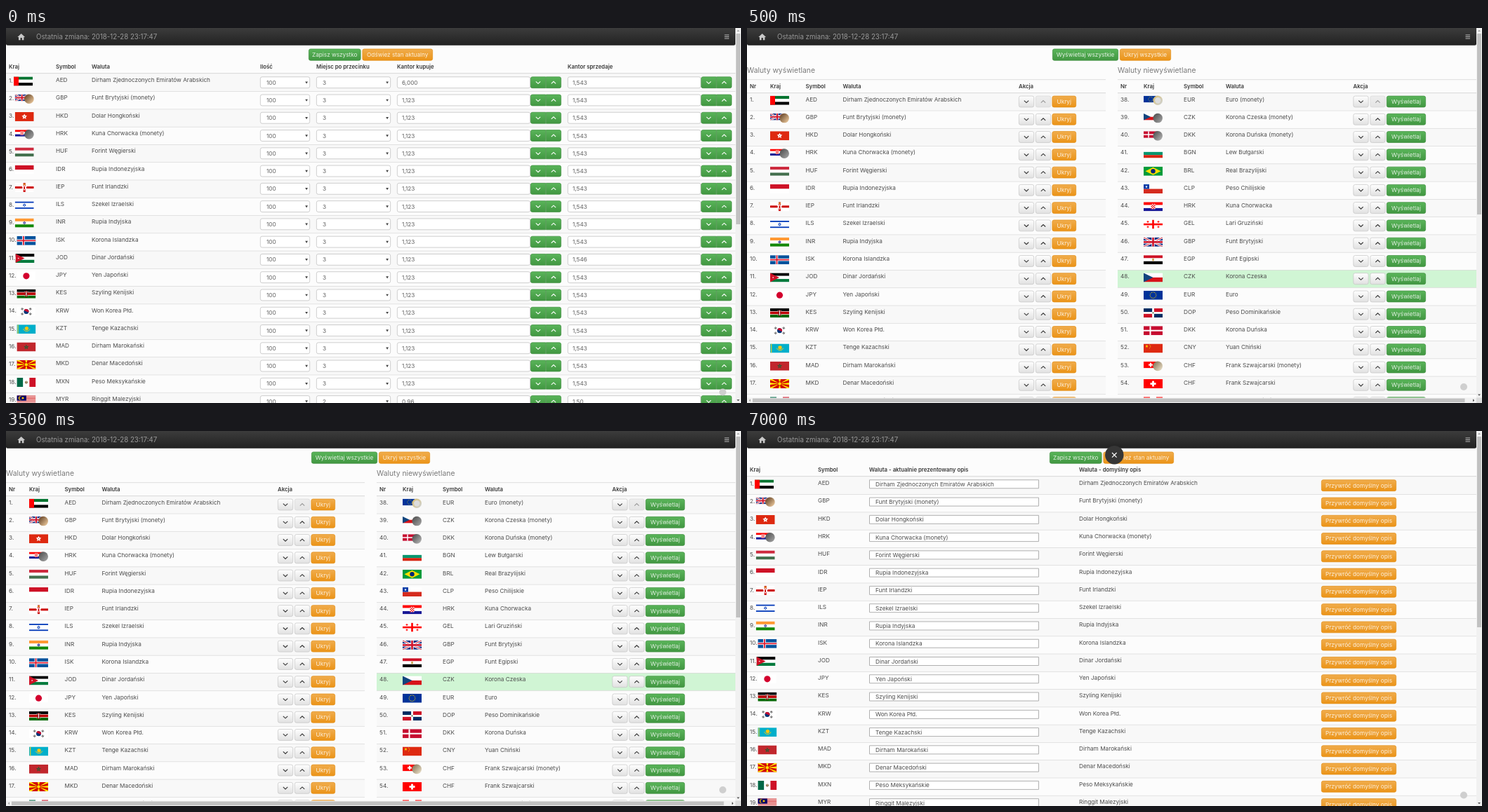
Recreate the animation shown at these times as an HTML page with a canvas. Size 1047x535 px, loop 8 s.

```html
<!DOCTYPE html>
<html lang="pl">
<head>
<meta charset="utf-8">
<title>Waluty</title>
<style>
html, body { margin: 0; width: 100%; height: 100%; overflow: hidden; background: #fcfcfc; }
canvas { display: block; }
</style>
</head>
<body>
<canvas id="stage" width="1047" height="535"></canvas>
<script>
const g = document.getElementById('stage').getContext('2d');
const STEP = 25.27, SIZE = 8.22;
const INK = '#4c4c4c', GREEN = ['#5ab55a', '#419641', '#3e8f3e'], ORANGE = ['#f0ad4e', '#eb9316', '#e38d13'],
  GREY = ['#ffffff', '#e0e0e0', '#c4c4c4'], OFF = ['#eeeeee', '#e4e4e4', '#d8d8d8'];

const parse = s => s.split('|').map(r => [r.slice(0, 3), r[3] === '*', r.slice(4).trim()]);
const shown = parse('AED Dirham Zjednoczonych Emiratów Arabskich|GBP*Funt Brytyjski (monety)|HKD Dolar Hongkoński|' +
  'HRK*Kuna Chorwacka (monety)|HUF Forint Węgierski|IDR Rupia Indonezyjska|IEP Funt Irlandzki|ILS Szekel Izraelski|' +
  'INR Rupia Indyjska|ISK Korona Islandzka|JOD Dinar Jordański|JPY Yen Japoński|KES Szyling Kenijski|KRW Won Korea Płd.|' +
  'KZT Tenge Kazachski|MAD Dirham Marokański|MKD Denar Macedoński|MXN Peso Meksykańskie|MYR Ringgit Malezyjski');
const hidden = parse('EUR*Euro (monety)|CZK*Korona Czeska (monety)|DKK*Korona Duńska (monety)|BGN Lew Bułgarski|' +
  'BRL Real Brazylijski|CLP Peso Chilijskie|HRK Kuna Chorwacka|GEL Lari Gruziński|GBP Funt Brytyjski|EGP Funt Egipski|' +
  'CZK Korona Czeska|EUR Euro|DOP Peso Dominikańskie|DKK Korona Duńska|CNY Yuan Chiński|CHF*Frank Szwajcarski (monety)|' +
  'CHF Frank Szwajcarski|CAD Dolar Kanadyjski');
// upper left and lower right shade of each coin
const coins = { GBP: ['#6b4a2c', '#e0bd92'], HRK: ['#555', '#999'], EUR: ['#d8c07a', '#d0d0c8'],
  CZK: ['#555', '#999'], DKK: ['#555', '#aaa'], CHF: ['#8a7a5c', '#e0d4bc'] };

function rect(x, y, w, h, c) { g.fillStyle = c; g.fillRect(x, y, w, h); }
function disc(x, y, r, c) { g.fillStyle = c; g.beginPath(); g.arc(x, y, r, 0, 7); g.fill(); }
function path(...p) {
  g.beginPath();
  for (let i = 0; i < p.length; i += 2) g.lineTo(p[i], p[i + 1]);
}
function poly(c, ...p) { path(...p); g.fillStyle = c; g.fill(); }
function line(c, w, ...p) { path(...p); g.strokeStyle = c; g.lineWidth = w; g.stroke(); }
function star(x, y, r, c, n = 5, inner = .4) {
  const p = [];
  for (let i = 0; i < 2 * n; i++) {
    const a = i * Math.PI / n, d = i % 2 ? r * inner : r;
    p.push(x + d * Math.sin(a), y - d * Math.cos(a));
  }
  poly(c, ...p);
}
function fade(x0, y0, x1, y1, from, to) {
  const f = g.createLinearGradient(x0, y0, x1, y1);
  f.addColorStop(0, from);
  f.addColorStop(1, to);
  return f;
}
// y is the middle of the capital letters
function text(s, x, y, c = INK, size = SIZE, weight = 400, align = 'left') {
  g.font = `${weight} ${size}px Inter, "Open Sans", sans-serif`;
  g.textAlign = align;
  g.fillStyle = c;
  g.fillText(s, x, y + size * .36);
}
const head = (s, x, y) => text(s, x, y, '#3a3a3a', 7.8, 600);

function box(x, y, w, h, fill, edge, r = 2.5, lw = .7) {
  g.beginPath();
  g.roundRect(x + lw / 2, y + lw / 2, w - lw, h - lw, r);
  g.fillStyle = fill; g.fill();
  g.strokeStyle = edge; g.lineWidth = lw; g.stroke();
}
function button(x, y, w, tone, label, h = 16.6, r = 2.5) {
  box(x, y, w, h, fade(0, y, 0, y + h, tone[0], tone[1]), tone[2], r);
  if (label) text(label, x + w / 2, y + h / 2, 'rgba(255,255,255,.85)', SIZE, 400, 'center');
}
function arrowButton(x, y, w, tone, dir, c, r) {
  button(x, y, w, tone, '', 16.6, r);
  const m = x + w / 2, v = y + 8.4;
  line(c, 1.1, m - 3.2, v - 1.5 * dir, m, v + 1.5 * dir, m + 3.2, v - 1.5 * dir);
}
function select(x, y, w, label) {
  box(x, y, w, 16.6, '#fff', '#bbb');
  text(label, x + 9, y + 8.4, '#5f5f5f');
  poly('#444', x + w - 6.8, y + 7, x + w - 3, y + 7, x + w - 4.9, y + 10.2);
}
function field(x, y, value) {
  box(x, y, 190, 16.6, '#fff', '#bbb');
  text(value, x + 7, y + 8.4, '#5f5f5f');
  arrowButton(x + 190, y, 22, GREEN, 1, '#fff', [2.5, 0, 0, 2.5]);
  arrowButton(x + 212, y, 22, GREEN, -1, '#fff', [0, 2.5, 2.5, 0]);
}

// Flags are drawn in a 27 by 13 box
const rows = (...c) => c.forEach((k, i) => rect(0, i * 13 / c.length, 27, 13 / c.length, k));
const cols = (...c) => c.forEach((k, i) => rect(i * 27 / c.length, 0, 27 / c.length, 13, k));
function cross(bg, c, x, w) {
  if (bg) rows(bg);
  rect(x - w / 2, 0, w, 13, c);
  rect(0, 6.5 - w / 2, 27, w, c);
}
const flags = {
  AED() { rows('#00732f', '#fff', '#000'); rect(0, 0, 7, 13, '#f00'); },
  GBP() {
    rows('#00247d');
    for (const [c, w] of [['#fff', 3], ['#cf142b', 1]]) {
      line(c, w, 0, 0, 27, 13);
      line(c, w, 0, 13, 27, 0);
    }
    cross(0, '#fff', 13.5, 4.4);
    cross(0, '#cf142b', 13.5, 2.6);
  },
  HKD() { rows('#de2910'); star(13.5, 6.5, 4, '#fff', 5, .5); disc(13.5, 6.5, .7, '#de2910'); },
  HRK() {
    rows('#f00', '#fff', '#171796');
    rect(10.5, 2.5, 6, 7.5, '#fff');
    for (let i = 0; i < 20; i++) if ((i + (i >> 2)) % 2 === 0)
      rect(10.5 + i % 4 * 1.5, 2.5 + (i >> 2) * 1.5, 1.5, 1.5, '#e00');
  },
  HUF() { rows('#cd2a3e', '#fff', '#436f4d'); },
  IDR() { rows('#ce1126', '#fff'); },
  IEP() {
    cross('#fff', '#cc0000', 13.5, 3);
    star(13.5, 6.8, 4.2, '#fff', 6, .6);
    rect(12.6, 5, 1.8, 4, '#cc0000');
    rect(12, 1, 3, 1.6, '#d8a62a');
  },
  ILS() {
    rows('#fff');
    rect(0, 1.4, 27, 1.8, '#0038b8');
    rect(0, 9.8, 27, 1.8, '#0038b8');
    star(13.5, 6.5, 2.6, '#0038b8', 6, .58);
    disc(13.5, 6.5, .9, '#fff');
  },
  INR() { rows('#ff9933', '#fff', '#138808'); disc(13.5, 6.5, 1.8, '#000088'); disc(13.5, 6.5, 1.1, '#aac'); },
  ISK() { cross('#02529c', '#fff', 9.5, 3.6); cross(0, '#dc1e35', 9.5, 1.8); },
  JOD() { rows('#000', '#fff', '#007a3d'); poly('#ce1126', 0, 0, 13, 6.5, 0, 13); star(4.2, 6.5, 1.3, '#fff', 7); },
  JPY() { rows('#fff'); disc(13.5, 6.5, 4.6, '#d3002d'); },
  KES() {
    rows('#000', '#fff', '#006600');
    rect(0, 4, 27, 5, '#fff');
    rect(0, 4.7, 27, 3.6, '#b00');
    g.beginPath(); g.ellipse(13.5, 6.5, 2, 4.6, 0, 0, 7); g.fillStyle = '#800'; g.fill();
    rect(13, 3, 1, 7, '#fff');
    line('#ddd', .4, 10.5, 2, 16.5, 11);
    line('#ddd', .4, 16.5, 2, 10.5, 11);
  },
  KRW() {
    rows('#fff');
    disc(13.5, 6.5, 3.5, '#003478');
    g.beginPath(); g.arc(13.5, 6.5, 3.5, Math.PI + .4, 2 * Math.PI + .4); g.fillStyle = '#c60c30'; g.fill();
    for (const sx of [-1, 1]) for (const sy of [-1, 1]) for (let k = 0; k < 3; k++) {
      const x = 13.5 + sx * (5 + k * .8), y = 6.5 + sy * (3 + k * .6);
      line('#111', .65, x - sx * .8, y + sy * 1.2, x + sx * .8, y - sy * 1.2);
    }
  },
  KZT() {
    rows('#00afca');
    rect(1, 0, 1.3, 13, '#d8cc38');
    star(14, 5.4, 3.2, '#fec50c', 12, .7);
    g.beginPath(); g.arc(14, 4.4, 5, .35, Math.PI - .35);
    g.strokeStyle = '#e8c820'; g.lineWidth = 1; g.stroke();
  },
  MAD() { rows('#c1272d'); star(13.5, 6.7, 3.9, '#176233'); star(13.5, 6.7, 1.7, '#a02a2d'); },
  MKD() {
    rows('#d20000');
    for (const [x, y, dx, dy] of [[0, 0, 3, 0], [27, 0, 3, 0], [13.5, 0, 1.6, 0], [0, 6.5, 0, 1.6]])
      poly('#ffe600', x - dx, y - dy, x + dx, y + dy, 27 - x - dx, 13 - y - dy, 27 - x + dx, 13 - y + dy);
    disc(13.5, 6.5, 2.9, '#d20000');
    disc(13.5, 6.5, 2.2, '#ffe600');
  },
  MXN() { cols('#006847', '#fff', '#ce1126'); disc(13.5, 6.5, 2, '#8a7050'); disc(13.5, 6, .9, '#c8b890'); },
  MYR() {
    for (let i = 0; i < 14; i++) rect(0, i * 13 / 14, 27, 1, i % 2 ? '#fff' : '#cc0001');
    rect(0, 0, 13.5, 7.4, '#010066');
    disc(5, 3.7, 2.6, '#fc0'); disc(5.9, 3.7, 2.2, '#010066'); star(8.6, 3.7, 2.1, '#fc0', 11, .5);
  },
  EUR() {
    rows('#003399');
    for (let i = 0; i < 12; i++) disc(13.5 + 4.3 * Math.cos(i * Math.PI / 6), 6.5 + 4.3 * Math.sin(i * Math.PI / 6), .6, '#fc0');
  },
  CZK() { rows('#fff', '#d7141a'); poly('#11457e', 0, 0, 13.5, 6.5, 0, 13); },
  DKK() { cross('#c60c30', '#fff', 9.5, 2); },
  BGN() { rows('#fff', '#00966e', '#d62612'); },
  BRL() { rows('#009b3a'); poly('#fedf00', 2.5, 6.5, 13.5, 1, 24.5, 6.5, 13.5, 12); disc(13.5, 6.5, 3.2, '#002776'); },
  CLP() { rows('#fff', '#d52b1e'); rect(0, 0, 8, 6.5, '#0039a6'); star(4, 3.3, 2, '#fff'); },
  GEL() {
    cross('#fff', '#f00', 13.5, 2.6);
    for (const x of [6, 21]) for (const y of [2.8, 10.2]) {
      rect(x - 1.5, y - .5, 3, 1, '#f00');
      rect(x - .5, y - 1.5, 1, 3, '#f00');
    }
  },
  EGP() { rows('#ce1126', '#fff', '#000'); rect(12.3, 4.8, 2.4, 3.4, '#c8a048'); },
  DOP() {
    cols('#002d62', '#ce1126');
    rect(0, 6.5, 13.5, 6.5, '#ce1126');
    rect(13.5, 6.5, 13.5, 6.5, '#002d62');
    cross(0, '#fff', 13.5, 2.8);
    disc(13.5, 6.5, 1.1, '#5a7a50');
  },
  CNY() {
    rows('#de2910');
    star(4.5, 3.6, 2.3, '#ffde00');
    for (let i = 0; i < 4; i++) disc(8.5 + (i % 3 ? 1.2 : 0), 1.4 + i * 1.6, .5, '#ffde00');
  },
  CHF() { rows('#f00'); rect(12.1, 2.5, 2.8, 8, '#fff'); rect(9.5, 5.1, 8, 2.8, '#fff'); },
  CAD() { cols('#f00', '#fff', '#f00'); star(13.5, 6.5, 4, '#f00'); }
};
function flag([code, coin], x, y) {
  g.save();
  g.translate(x, y);
  g.save();
  if (coin) g.scale(.74, .74);
  g.beginPath(); g.rect(0, 0, 27, 13); g.clip();
  flags[code]();
  g.restore();
  if (coin) {
    disc(20.2, 6.6, 6.8, fade(15, 2, 25, 11, ...coins[code]));
    if (code === 'EUR') disc(20.2, 6.6, 4.2, '#ddd');
  }
  g.restore();
}

function stripe(x, y, w, i, tint) {
  if (tint || i % 2 === 0) rect(x, y, w, STEP, tint || '#f8f8f8');
  if (i) rect(x, y, w, .7, '#d8d8d8');
}
function frame() {
  rect(0, 0, 1047, 535, '#fcfcfc');
  g.beginPath(); g.roundRect(0, -4, 1039, 28.8, 2.5);
  g.fillStyle = fade(0, 0, 0, 25, '#3c3c3c', '#212121'); g.fill();
  poly('#c8c8c8', 16.3, 13, 21.7, 8, 27.1, 13, 25.4, 13, 25.4, 17.2, 22.8, 17.2, 22.8, 14, 20.6, 14, 20.6, 17.2, 18, 17.2, 18, 13);
  text('Ostatnia zmiana: 2018-12-28 23:17:47', 43, 12.6, '#999', 9.7);
  for (let i = 0; i < 3; i++) rect(1023.5, 9.5 + i * 2.5, 6.5, 1, '#bbb');
}
function scrollbars(wide) {
  const end = wide ? 527.5 : 535;
  disc(1021, end - 15.5, 5, '#cfcfcf');
  rect(1039, 0, 8, 535, '#f1f1f1');
  rect(1040, 8, 6, (wide ? 266 : 280) - 8, '#c1c1c1');
  poly('#a3a3a3', 1041, 5, 1045, 5, 1043, 2.8);
  poly('#505050', 1041, end - 5, 1045, end - 5, 1043, end - 2.8);
  if (!wide) return;
  rect(0, 527.5, 1039, 7.5, '#f1f1f1');
  rect(8, 528.5, 1014.5, 5.5, '#c1c1c1');
  rect(1039, 527.5, 8, 7.5, '#dcdcdc');
  poly('#a3a3a3', 5, 529.3, 5, 533.3, 2.8, 531.3);
  poly('#505050', 1034, 529.3, 1034, 533.3, 1036.2, 531.3);
}

function listTop() {
  frame();
  button(431, 29.6, 74.5, GREEN, 'Zapisz wszystko', 17);
  button(507.5, 29.6, 100.5, ORANGE, 'Odśwież stan aktualny', 17);
  head('Kraj', 4, 55.3);
}
function listRows(symbolX, cells) {
  shown.forEach((cur, i) => {
    const y = 65 + i * STEP, flagX = i > 8 ? (i === 10 ? 13.5 : 15.4) : i ? 12.7 : 11;
    stripe(0, y, 1039, i);
    text(i + 1 + '.', 4, y + 10);
    flag(cur, flagX, y + 4.4);
    text(cur[0], symbolX, y + 9.2);
    cells(cur[2], y, i);
  });
  rect(0, 64, 1039, 1.2, '#ddd');
  scrollbars(false);
}

function rates() {
  listTop();
  [['Symbol', 71], ['Waluta', 122], ['Ilość', 362], ['Miejsc po przecinku', 442], ['Kantor kupuje', 557],
    ['Kantor sprzedaje', 800]].forEach(([s, x]) => head(s, x, 55.3));
  listRows(71, (name, y, i) => {
    const last = i === 18, top = y + 4.4;
    text(name, 122, y + 9.2);
    select(362, top, 71, '100');
    select(442, top, 106, last ? '2' : '3');
    field(557, top, last ? '0.96' : i ? '1,123' : '6,000');
    field(800, top, last ? '1.50' : i === 10 ? '1,546' : '1,543');
  });
}

function panel(x, w, title, list, first, at, tone, label, labelW) {
  text(title, x, 59.9, '#7a7a7a', 10.35);
  rect(x, 73.3, w, .8, '#d8d8d8');
  ['Nr', 'Kraj', 'Symbol', 'Waluta', 'Akcja'].forEach((s, k) => head(s, at[k], 83));
  list.slice(0, 18).forEach((cur, i) => {
    const y = 92.4 + i * STEP, top = y + 4.3, a = at[4];
    stripe(x, y, w, i, first + i === 48 && '#d0f5d4');
    text(first + i + '.', at[0], y + 9.2);
    flag(cur, at[1], y + 4.3);
    text(cur[0], at[2], y + 9.2);
    text(cur[2], at[3], y + 9.2);
    arrowButton(a, top, 22, GREY, 1, '#333');
    arrowButton(a + 24, top, 22, i ? GREY : OFF, -1, i ? '#333' : '#999');
    button(a + 47.5, top, labelW, tone, label);
  });
  rect(x, 92, w, 1.2, '#ddd');
}
function visibility() {
  frame();
  button(435, 29.6, 94, GREEN, 'Wyświetlaj wszystkie', 17);
  button(531, 29.6, 73, ORANGE, 'Ukryj wszystkie', 17);
  panel(0, 511, 'Waluty wyświetlane', shown, 1, [4, 33, 83.5, 136.5, 387], ORANGE, 'Ukryj', 34.5);
  panel(528, 511, 'Waluty niewyświetlane', hidden, 38, [532, 565, 622, 682, 863.5], GREEN, 'Wyświetlaj', 56);
  scrollbars(true);
}

function names() {
  listTop();
  [['Symbol', 101], ['Waluta - aktualnie prezentowany opis', 174], ['Waluta - domyślny opis', 473]]
    .forEach(([s, x]) => head(s, x, 55.3));
  listRows(101, (name, y) => {
    box(174, y + 4.3, 242, 13, '#fff', '#b0b0b0', 0, 1);
    text(name, 183, y + 10.9);
    text(name, 473, y + 9.2);
    button(818, y + 4.4, 107, ORANGE, 'Przywróć domyślny opis');
  });
  disc(523.3, 34.2, 13.2, '#363636');
  line('#fff', 1.2, 520, 31, 526.6, 37.6);
  line('#fff', 1.2, 526.6, 31, 520, 37.6);
}

let current;
const start = performance.now();
function tick() {
  const t = (performance.now() - start) % 8000;
  const scene = t < 500 ? rates : t < 5500 ? visibility : names;
  if (scene !== current) (current = scene)();
  requestAnimationFrame(tick);
}
tick();
</script>
</body>
</html>
```
